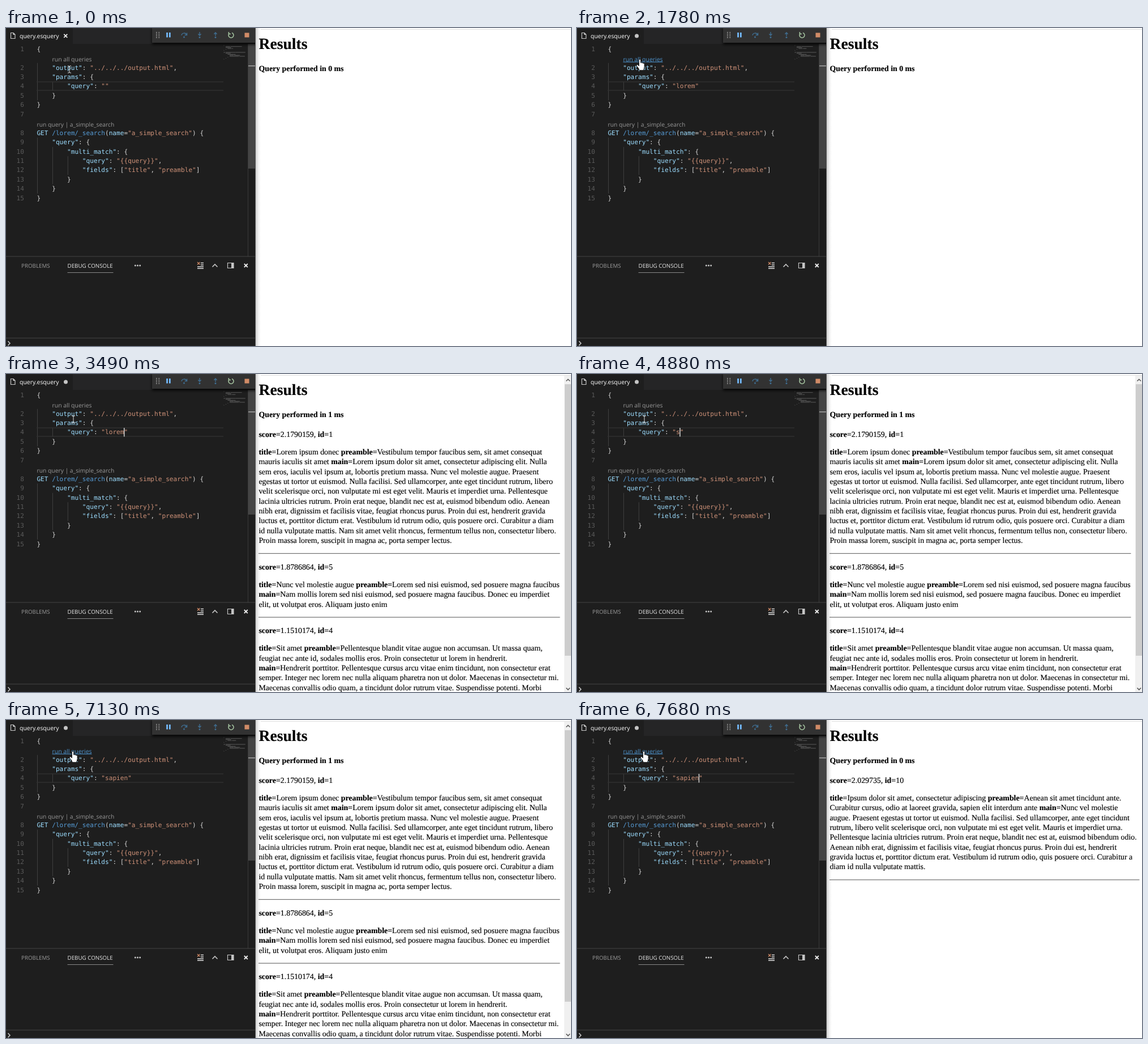
These frames come from a looping animation (998x561 px, 8060 ms). An HTML page:

```html
<!DOCTYPE html>
<html lang="en">
<head>
<meta charset="utf-8">
<title>Query editor</title>
<style>
  html, body { margin: 0; width: 100%; height: 100%; overflow: hidden; background: #fff; }
  svg { display: block; }
  text { white-space: pre; text-rendering: geometricPrecision; }
  .code { font: 11.13px "DejaVu Sans Mono", monospace; fill: #d4d4d4; }
  .number { fill: #5a5a5a; text-anchor: end; }
  .ui { font: 10.45px "Open Sans", sans-serif; fill: #999; }
  .tab { font-size: 9.8px; }
  .page { font: 13.87px "Liberation Serif", serif; fill: #000; stroke: #000; stroke-width: .15px; }
  .bold { font-weight: bold; }
  .line { fill: none; stroke: #c5c5c5; stroke-width: 1.2; }
  .step { fill: none; stroke: #3f6d90; stroke-width: 1.4; }
</style>
</head>
<body>
<svg id="stage" width="998" height="561" viewBox="0 0 998 561">
  <defs>
    <linearGradient id="edge">
      <stop offset="0" stop-color="#cfcfcf"/>
      <stop offset=".5" stop-color="#f0f0f0"/>
      <stop offset="1" stop-color="#fff"/>
    </linearGradient>
    <filter id="shadow" x="-10%" y="-50%" width="120%" height="220%">
      <feDropShadow dx="0" dy="3" stdDeviation="2.5" flood-color="#000" flood-opacity=".9"/>
    </filter>
    <clipPath id="editorClip"><rect width="440" height="561"/></clipPath>
  </defs>

  <rect width="998" height="561" fill="#fff"/>
  <rect x="440" y="2" width="558" height="1" fill="#dedede"/>
  <rect x="441" width="9" height="561" fill="url(#edge)"/>
  <rect x="440" width="1" height="561" fill="#555"/>
  <g id="results"></g>

  <g clip-path="url(#editorClip)">
    <rect width="440" height="561" fill="#1e1e1e"/>
    <rect x="118" width="322" height="28" fill="#252526"/>
    <path d="M8.5 8.5h4.5l3 3v7h-7.5zM13 8.5v3h3" class="line"/>
    <text x="24" y="17.8" class="ui" style="fill:#fff">query.esquery</text>
    <path id="close" d="M102.3 10.8l6 6m0-6l-6 6" class="line" style="stroke:#eee;stroke-width:1.8"/>
    <circle id="dirty" cx="105.5" cy="14" r="3.5" fill="#c5c5c5"/>

    <g id="guides" fill="#404040"></g>
    <path d="M54 95H384M54 110H384" stroke="#303030" stroke-width="1.6"/>
    <g id="rows"></g>
    <g id="minimap" fill="#c8c8c8" opacity=".4"></g>
    <text id="runAll" x="81.5" y="58.5" class="ui">run all queries</text>
    <text x="54.5" y="173.6" class="ui" style="font-size:10.3px">run query | a_simple_search</text>
    <rect id="caret" y="95" width="1.6" height="15.5" fill="#c8c8c8"/>

    <rect x="427" y="28" width="1" height="375" fill="#3a3a3a"/>
    <rect x="428" y="28" width="12" height="220" fill="#444"/>
    <rect x="428" y="66" width="12" height="1.6" fill="#a0a0a0"/>

    <g filter="url(#shadow)"><rect x="258" y="-2" width="190" height="28" fill="#333"/></g>
    <g id="grip" fill="#999"></g>
    <path d="M283.2 8h2.7v8.5h-2.7zM288 8h2.7v8.5h-2.7z" fill="#75beff"/>
    <path d="M310 13a4.7 4.7 0 0 1 9-1M319.6 8.5v4h-4" class="step"/>
    <path d="M342 7v6M339.4 10.4l2.6 2.8 2.6-2.8M370 14V8M367.4 10.8l2.6-2.8 2.6 2.8" class="step"/>
    <g fill="#3f6d90">
      <circle cx="314.5" cy="16" r="1.5"/><circle cx="342" cy="16.6" r="1.5"/><circle cx="370" cy="16.6" r="1.5"/>
    </g>
    <path d="M394.5 9.4a4.5 4.5 0 1 0 4.6-.9M393.4 7v3.4h3.6" class="line" style="stroke:#a9c9a4;stroke-width:1.5"/>
    <rect x="421.5" y="8.5" width="8" height="8" fill="#d18b67"/>

    <rect y="402.5" width="440" height="1" fill="#454545"/>
    <text x="27" y="422.5" class="ui tab">PROBLEMS</text>
    <text x="108.5" y="422.5" class="ui tab" style="fill:#e7e7e7">DEBUG CONSOLE</text>
    <rect x="108.5" y="431" width="81" height="1" fill="#8a8a8a"/>
    <g fill="#c5c5c5">
      <circle cx="228.3" cy="419" r="1.5"/><circle cx="232.5" cy="419" r="1.5"/><circle cx="236.7" cy="419" r="1.5"/>
    </g>
    <path d="M344 414.5h5M344 418h5M338 421.3h11M338 424.3h11" class="line" style="stroke:#e0e0e0;stroke-width:1.5"/>
    <path d="M338 413l4.5 4.5m0-4.5l-4.5 4.5" class="line" style="stroke:#d18b67"/>
    <path d="M364.5 421.5l4.5-4.5 4.5 4.5" class="line" style="stroke-width:1.6"/>
    <path d="M391.5 414.5h10.5v9h-10.5z" class="line"/>
    <rect x="398" y="414.5" width="4" height="9" fill="#c5c5c5"/>
    <path d="M420.8 416l6 6m0-6l-6 6" class="line" style="stroke:#eee;stroke-width:1.8"/>
    <rect y="546.5" width="440" height="1" fill="#454545"/>
    <path d="M3.5 552.5l3.5 3.7-3.5 3.7" class="line" style="stroke-width:1.6"/>

    <path id="beam" d="M-3-6.3q3 0 3 1.6V4.7q0 1.6-3 1.6M3-6.3q-3 0-3 1.6M3 6.3q-3 0-3-1.6" class="line" style="stroke:#ddd;stroke-width:1"/>
    <path id="hand" d="M-2.5-.5V-8.5a1.5 1.5 0 0 1 3 0V-3.5a1.3 1.3 0 0 1 2.4.4 1.3 1.3 0 0 1 2.2.7 1.2 1.2 0 0 1 2 .9V3Q6.9 6 5.3 9.7H-1.5Q-2.5 6.5-6.5 2.1a1.4 1.4 0 0 1 2.2-1.8L-2.5 2Z" fill="#fff" stroke="#000" stroke-width=".8"/>
  </g>
</svg>
<script>
const LOOP = 8060, LEFT = 54.4, CHAR = 6.702, PITCH = 16.45, PAGE_LEFT = 446.4;
const $ = id => document.getElementById(id);

function add(parent, tag, attrs = {}, text = '') {
  const node = document.createElementNS('http://www.w3.org/2000/svg', tag);
  for (const key in attrs) node.setAttribute(key, attrs[key]);
  node.textContent = text;
  return parent.appendChild(node);
}

// ---- editor ----
const queryLine = word => `        "query": "${word}"`;
// null marks a slot taken by an inline command
const source = [
  '{', null, '    "output": "../../../output.html",', '    "params": {', queryLine(''), '    }', '}', '', null,
  'GET /lorem/_search(name="a_simple_search") {', '    "query": {', '        "multi_match": {',
  '            "query": "{{query}}",', '            "fields": ["title", "preamble"]',
  '        }', '    }', '}'
];

function tokenColor(token, next = '') {
  if (token[0] === '"') return next[0] === ':' ? '#9cdcfe' : '#ce9178';
  if (token === 'GET' || token === 'name') return '#9cdcfe';
  return token[0] === '/' ? '#569cd6' : '#d4d4d4';
}

function fillRow(row, line) {
  row.text.textContent = row.mini.textContent = '';
  let column = line.search(/\S|$/);
  row.text.setAttribute('x', LEFT + column * CHAR);
  const tokens = line.trim().split(/("[^"]*"|GET|\/lorem\/_search|name)/).filter(Boolean);
  tokens.forEach((token, i) => {
    add(row.text, 'tspan', { fill: tokenColor(token, tokens[i + 1]) }, token);
    const width = token.trimEnd().length * .87;
    add(row.mini, 'rect', { x: 384.5 + column * .87, y: row.miniY, width, height: .9 });
    column += token.length;
  });
}

const rows = [];
source.forEach((line, slot) => {
  if (line === null) return;
  const y = 40.6 + slot * PITCH, number = rows.length + 1;
  add($('rows'), 'text', { x: 32, y, class: 'code number' }, number);
  const row = {
    text: add($('rows'), 'text', { y, class: 'code' }),
    mini: add($('minimap'), 'g'),
    miniY: 30.5 + rows.length * 1.72
  };
  fillRow(row, line);
  rows.push(row);
});

// indent level, first slot, slot count
for (const [level, first, count] of [[0, 2, 4], [1, 4, 1], [0, 10, 6], [1, 11, 4], [2, 12, 2]])
  add($('guides'), 'rect', { x: 55 + level * 26.9, y: 28.8 + first * PITCH, width: 1, height: count * PITCH });

for (let i = 0; i < 8; i++)
  add($('grip'), 'rect', { x: 265 + i % 2 * 4.4, y: 7 + (i >> 1) * 3, width: 1.8, height: 1.6 });

// ---- results pages; *marks* are bold ----
const firstHits = [
  ['*score=*2.1790159, *id=*1',
   '*title=*Lorem ipsum donec *preamble=*Vestibulum tempor faucibus sem, sit amet consequat',
   'mauris iaculis sit amet *main=*Lorem ipsum dolor sit amet, consectetur adipiscing elit. Nulla',
   'sem eros, iaculis vel ipsum at, lobortis pretium massa. Nunc vel molestie augue. Praesent',
   'egestas ut tortor ut euismod. Nulla facilisi. Sed ullamcorper, ante eget tincidunt rutrum, libero',
   'velit scelerisque orci, non vulputate mi est eget velit. Mauris et imperdiet urna. Pellentesque',
   'lacinia ultricies rutrum. Proin erat neque, blandit nec est at, euismod bibendum odio. Aenean',
   'nibh erat, dignissim et facilisis vitae, feugiat rhoncus purus. Proin dui est, hendrerit gravida',
   'luctus et, porttitor dictum erat. Vestibulum id rutrum odio, quis posuere orci. Curabitur a diam',
   'id nulla vulputate mattis. Nam sit amet velit rhoncus, fermentum tellus non, consectetur libero.',
   'Proin massa lorem, suscipit in magna ac, porta semper lectus.'],
  ['*score=*1.8786864, *id=*5',
   '*title=*Nunc vel molestie augue *preamble=*Lorem sed nisi euismod, sed posuere magna faucibus',
   '*main=*Nam mollis lorem sed nisi euismod, sed posuere magna faucibus. Donec eu imperdiet',
   'elit, ut volutpat eros. Aliquam justo enim'],
  ['*score=*1.1510174, *id=*4',
   '*title=*Sit amet *preamble=*Pellentesque blandit vitae augue non accumsan. Ut massa quam,',
   'feugiat nec ante id, sodales mollis eros. Proin consectetur ut lorem in hendrerit.',
   '*main=*Hendrerit porttitor. Pellentesque cursus arcu vitae enim tincidunt, non consectetur erat',
   'semper. Integer nec lorem nec nulla aliquam pharetra non ut dolor. Maecenas in consectetur mi.',
   'Maecenas convallis odio quam, a tincidunt dolor rutrum vitae. Suspendisse potenti. Morbi']
];
const secondHits = [
  ['*score=*2.029735, *id=*10',
   '*title=*Ipsum dolor sit amet, consectetur adipiscing *preamble=*Aenean sit amet tincidunt ante.',
   'Curabitur cursus, odio at laoreet gravida, sapien elit interdum ante *main=*Nunc vel molestie',
   'augue. Praesent egestas ut tortor ut euismod. Nulla facilisi. Sed ullamcorper, ante eget tincidunt',
   'rutrum, libero velit scelerisque orci, non vulputate mi est eget velit. Mauris et imperdiet urna.',
   'Pellentesque lacinia ultricies rutrum. Proin erat neque, blandit nec est at, euismod bibendum odio.',
   'Aenean nibh erat, dignissim et facilisis vitae, feugiat rhoncus purus. Proin dui est, hendrerit',
   'gravida luctus et, porttitor dictum erat. Vestibulum id rutrum odio, quis posuere orci. Curabitur a',
   'diam id nulla vulputate mattis.']
];

function richText(parent, y, line) {
  const text = add(parent, 'text', { x: PAGE_LEFT, y, class: 'page' });
  line.split('*').forEach((part, i) => part && add(text, 'tspan', i % 2 ? { class: 'bold' } : {}, part));
}

function addPage(ms, hits, scrolls) {
  const page = add($('results'), 'g');
  add(page, 'text', { x: PAGE_LEFT, y: 36.5, class: 'page bold', style: 'font-size:27.7px' }, 'Results');
  richText(page, 75.5, `*Query performed in ${ms} ms*`);
  let y = 110.8;
  for (const [score, ...lines] of hits) {
    richText(page, y, score);
    y += 31.2;
    lines.forEach((line, i) => richText(page, y + i * 17.33, line));
    y += (lines.length - 1) * 17.33;
    add(page, 'rect', { x: 446, y: y + 18, width: scrolls ? 532.5 : 547.5, height: 1.2, fill: '#707070' });
    y += 46.7;
  }
  if (scrolls) {
    add(page, 'rect', { x: 986, y: 3, width: 12, height: 558, fill: '#f0f0f0' });
    add(page, 'rect', { x: 987, y: 18, width: 11, height: 479, fill: '#cdcdcd' });
    add(page, 'path', { d: 'M989.5 12.5l3.3-3.3 3.3 3.3M989.5 553.8l3.3 3.3 3.3-3.3', fill: 'none', stroke: '#555', 'stroke-width': 1.5 });
  }
  return page;
}
const pages = [addPage(0, [], false), addPage(1, firstHits, true), addPage(0, secondHits, false)];

// ---- timeline: each entry is [start, value...] ----
const words = [
  [0, ''], [170, 'l'], [320, 'lo'], [470, 'lor'], [560, 'lore'], [640, 'lorem'],
  [3790, 'lore'], [4020, 'lor'], [4190, 'lo'], [4340, 'l'], [4570, ''],
  [4880, 's'], [5030, 'sa'], [5110, 'sap'], [5360, 'sapi'], [5580, 'sapie'], [5660, 'sapien']
];
const carets = [
  [0, 0], [170, 1], [1170, 0], [1700, 1], [1780, 0], [2250, 1], [2710, 0], [3260, 1],
  [6210, 0], [6670, 1], [7130, 0], [7600, 1]
];
const pointers = [
  [0, 'beam', 112, 73], [1240, 'beam', 112, 62], [1470, 'hand', 112, 67], [1550, 'hand', 112, 66],
  [1700, 'hand', 112, 65], [3260, 'hand', 113, 66], [3340, 'beam', 116, 71], [3410, 'beam', 118, 77],
  [3490, 'beam', 119, 80], [6440, 'beam', 119, 77], [6520, 'beam', 119, 71], [6600, 'hand', 119, 67],
  [6750, 'hand', 119, 66], [6830, 'hand', 118.5, 65], [6980, 'hand', 119, 65]
];
const shownPages = [[0, 0], [2100, 1], [7680, 2]];

const at = (steps, time) => steps.findLast(step => step[0] <= time);
const show = (node, on) => { node.style.display = on ? '' : 'none'; };
let shownWord = '';

function draw(time) {
  const [, word] = at(words, time);
  if (word !== shownWord) fillRow(rows[3], queryLine(word));
  shownWord = word;

  show($('close'), time < 170);
  show($('dirty'), time >= 170);
  show($('caret'), at(carets, time)[1]);
  $('caret').setAttribute('x', LEFT + (18 + word.length) * CHAR - .6);

  const [, kind, x, y] = at(pointers, time), hover = kind === 'hand';
  show($('beam'), !hover);
  show($('hand'), hover);
  $(kind).setAttribute('transform', `translate(${x} ${y})`);
  $('runAll').style.fill = hover ? '#4e94ce' : '';
  $('runAll').style.textDecoration = hover ? 'underline' : '';

  const [, current] = at(shownPages, time);
  pages.forEach((page, i) => show(page, i === current));
}

const start = performance.now();
function tick() {
  draw((performance.now() - start) % LOOP);
  requestAnimationFrame(tick);
}
tick();
</script>
</body>
</html>
```
